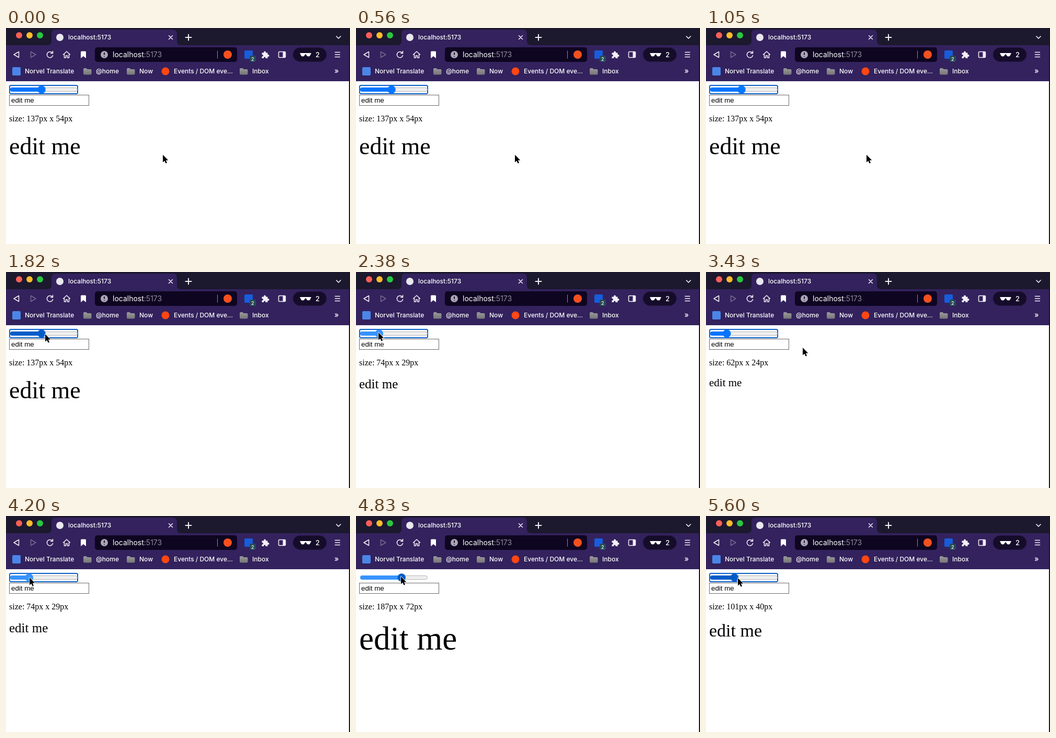
Animation of 658x414 px, one loop 5670 ms. Source, as an HTML page:

```html
<!DOCTYPE html>
<html lang="en">
<head>
<meta charset="utf-8">
<title>Slider demo</title>
<style>
  html, body { margin: 0; width: 100%; height: 100%; overflow: hidden; background: #fff; }
  svg { display: block; width: 658px; height: 414px; }
  .ui { font: 500 12px Inter, Roboto, sans-serif; fill: #fff; }
  .address { font-size: 14px; font-weight: 400; }
  .page { font: 16px "Liberation Serif", Times, serif; }
  .field { font: 13.333px "Liberation Sans", Arial, sans-serif; }
  .line { fill: none; stroke: #f3f0f8; stroke-width: 1.5; stroke-linecap: round; stroke-linejoin: round; }
</style>
</head>
<body>
<svg viewBox="0 0 658 414">
  <defs>
    <linearGradient id="grey" x2="0" y2="1">
      <stop stop-color="#9a9a9c"/><stop offset="1" stop-color="#767678"/>
    </linearGradient>
    <path id="folder" fill="url(#grey)" d="M0 2Q0 0 2 0H5.5L7.5 2H13.500Q15.500 2 15.500 4V10.500Q15.500 12.500 13.500 12.500H2Q0 12.500 0 10.500Z"/>
  </defs>

  <!-- window -->
  <rect width="658" height="414" fill="#17182b"/>
  <rect width="656" height="102" fill="#1c182e"/>
  <path fill="#33225d" d="M0 33H79Q87 33 87 25V11Q87 3 95 3H319Q327 3 327 11V25Q327 33 335 33H656V102H0Z"/>
  <rect y="102" width="656" height="312" fill="#fff"/>

  <!-- tab strip -->
  <circle cx="25" cy="14" r="6" fill="#ff5f57"/>
  <circle cx="45" cy="14" r="6" fill="#febc2e"/>
  <circle cx="65" cy="14" r="6" fill="#28c840"/>
  <circle cx="103" cy="18" r="7" fill="#e9e7ee"/>
  <g class="line">
    <path d="M311.500 14.500l7 7m0-7l-7 7"/>
    <path d="M349 12.500v11M343.500 18h11" stroke-width="2"/>
    <path d="M632 16l4 4 4-4" stroke-width="1.700"/>
  </g>

  <!-- toolbar -->
  <g class="line">
    <path d="M24.500 45.500V56.500L15 51Z"/>
    <path d="M47.500 45.500V56.500L57 51Z" stroke="#75698f"/>
    <path d="M88.500 47.500A5.700 5.700 0 1 0 89.600 52.500M89.500 44.500V48.500H85.500"/>
    <path d="M109.500 51L116 45L122.500 51M111.500 50V57H114.500V53H117.500V57H120.500V50"/>
    <rect x="521.500" y="45.500" width="13" height="11" rx="1.500"/>
    <path d="M629.500 46.500h9M629.500 51h9M629.500 55.500h9"/>
  </g>
  <path d="M143 46Q143 44.500 144.500 44.500H151.500Q153 44.500 153 46V58L148 54L143 58Z" fill="#fff"/>
  <rect x="529.500" y="46" width="5" height="10" fill="#f3f0f8"/>
  <rect x="170" y="37" width="272" height="28" rx="5" fill="#0e0621"/>
  <circle cx="188" cy="51" r="7" fill="#a9a5b4"/>
  <path d="M188 47v4.500M188 54v1" stroke="#0e0621" stroke-width="1.800"/>
  <path d="M404.500 43.500v15" stroke="#8e899b"/>
  <circle cx="424" cy="51" r="8" fill="#f4501f"/>
  <rect x="456" y="43" width="16" height="16" rx="2" fill="#175ddc"/>
  <rect x="466" y="53" width="12" height="12" rx="2" fill="#284b57"/>
  <path fill="#f3f0f8" d="M489.500 47.500H493V46.500A2 2 0 0 1 497 46.500V47.500H500.500V51H501.500A2 2 0 0 1 501.500 55H500.500V58H496.500V57A1.800 1.800 0 0 0 493 57V58H489.500V54.500H490.500A1.800 1.800 0 0 0 490.500 51H489.500Z"/>
  <rect x="549" y="37.500" width="64" height="27" rx="13.500" fill="#150c2a"/>
  <path fill="#fff" d="M562.500 48H583.500V50L582.500 50.500Q582 54.500 578.500 54.500Q575 54.500 574.200 50.500H571.800Q571 54.500 567.500 54.500Q564 54.500 563.500 50.500L562.500 50Z"/>

  <!-- bookmarks -->
  <rect x="12" y="75" width="16" height="16" rx="2" fill="#4a86e8"/>
  <use href="#folder" x="148" y="77"/>
  <use href="#folder" x="231" y="77"/>
  <use href="#folder" x="447" y="77"/>
  <circle cx="305" cy="83" r="7.500" fill="#ff4714"/>

  <g class="ui">
    <text x="119" y="22">localhost:5173</text>
    <text x="204" y="56" class="address">localhost<tspan fill="#918c9f">:5173</tspan></text>
    <text x="469" y="62.500" font-size="9" style="font-size:9px">2</text>
    <text x="592" y="56" style="font-size:13px">2</text>
    <text x="36" y="87">Norvel Translate</text>
    <text x="172" y="87">@home</text>
    <text x="255" y="87">Now</text>
    <text x="321" y="87">Events / DOM eve…</text>
    <text x="471" y="87">Inbox</text>
    <text x="628" y="87" style="font-size:14px">»</text>
  </g>

  <!-- page -->
  <rect id="ring" x="7" y="110" width="130" height="16" rx="2.500" fill="none" stroke="#0b60c9" stroke-width="2"/>
  <rect x="8.500" y="114.500" width="128" height="7" rx="3.500" fill="#efefef" stroke="#b5b5b5"/>
  <rect id="fill" x="8" y="114" height="8" rx="4"/>
  <circle id="thumb" cy="118" r="7.800"/>
  <rect x="6.500" y="128.500" width="152" height="20" fill="#fff" stroke="#6b6b6b"/>
  <text x="10" y="143" class="field">edit me</text>
  <text id="label" x="6" y="179" class="page"></text>
  <text id="big" x="6" class="page">edit me</text>
  <path id="cursor" d="M0 0V14.500L3.300 11.400L5.600 16.600L8 15.500L5.800 10.500H10.300Z" stroke="#fff" stroke-width="1.600" paint-order="stroke" stroke-linejoin="round"/>
</svg>

<script>
const LOOP = 5670, STEP = 70;
const NORMAL = '#0075ff', HOVER = '#005cc8', ACTIVE = '#3793ff';
const $ = id => document.getElementById(id);
const [ring, fill, thumb, label, big, cursor] =
  ['ring', 'fill', 'thumb', 'label', 'big', 'cursor'].map($);

// time, x, y
const path = [
  [0, 300, 243], [1050, 307, 243], [1820, 75, 119], [1890, 73, 119],
  [2800, 19, 113], [3080, 41, 117], [3430, 185, 145], [3640, 188, 146],
  [4060, 41, 118], [4830, 86, 116], [5460, 56, 118], [5600, 61, 119]
];
// time, font size
const sizes = [
  [1890, 46], [2800, 9], [3080, 21], [4060, 21], [4830, 63], [5460, 34]
];

const within = (t, a, b) => t >= a && t < b;

function sample(keys, t) {
  const i = keys.findIndex(k => k[0] > t);
  if (i < 0) return keys[keys.length - 1].slice(1);
  if (i === 0) return keys[0].slice(1);
  const a = keys[i - 1], b = keys[i];
  const u = (t - a[0]) / (b[0] - a[0]);
  const e = u * u * (3 - 2 * u);
  return a.slice(1).map((v, n) => v + (b[n + 1] - v) * e);
}

// Line metrics of a serif font: ascent, descent and 15% extra on top
function metrics(size) {
  const up = Math.round(size * 0.75), down = Math.round(size * 0.25);
  const extra = Math.floor((up + down) * 0.15 + 0.5);
  return { ascent: Math.max(14, up + extra), height: Math.max(18, up + down + extra) };
}

function draw(t) {
  const [x, y] = sample(path, t);
  const size = Math.round(sample(sizes, t)[0]);
  const pressed = within(t, 1890, 3080) || within(t, 4060, 5460);
  const hover = within(x, 6, 138) && within(y, 109, 127);
  const blurred = within(t, 4700, 4960);
  const color = pressed ? ACTIVE : hover ? HOVER : NORMAL;
  const center = 16 + size * 1.13;
  const { ascent, height } = metrics(size);

  ring.style.visibility = blurred ? 'hidden' : 'visible';
  fill.setAttribute('width', center - 8);
  fill.setAttribute('fill', color);
  thumb.setAttribute('cx', center);
  thumb.setAttribute('fill', blurred ? HOVER : color);
  label.textContent = `size: ${Math.round(size * 2.972)}px x ${height}px`;
  big.style.fontSize = size + 'px';
  big.setAttribute('y', 200 + ascent);
  cursor.setAttribute('transform', `translate(${Math.round(x)} ${Math.round(y)})`);
}

const start = performance.now();
function tick() {
  const t = (performance.now() - start) % LOOP;
  draw(Math.floor(t / STEP) * STEP);
  requestAnimationFrame(tick);
}
tick();
</script>
</body>
</html>
```
